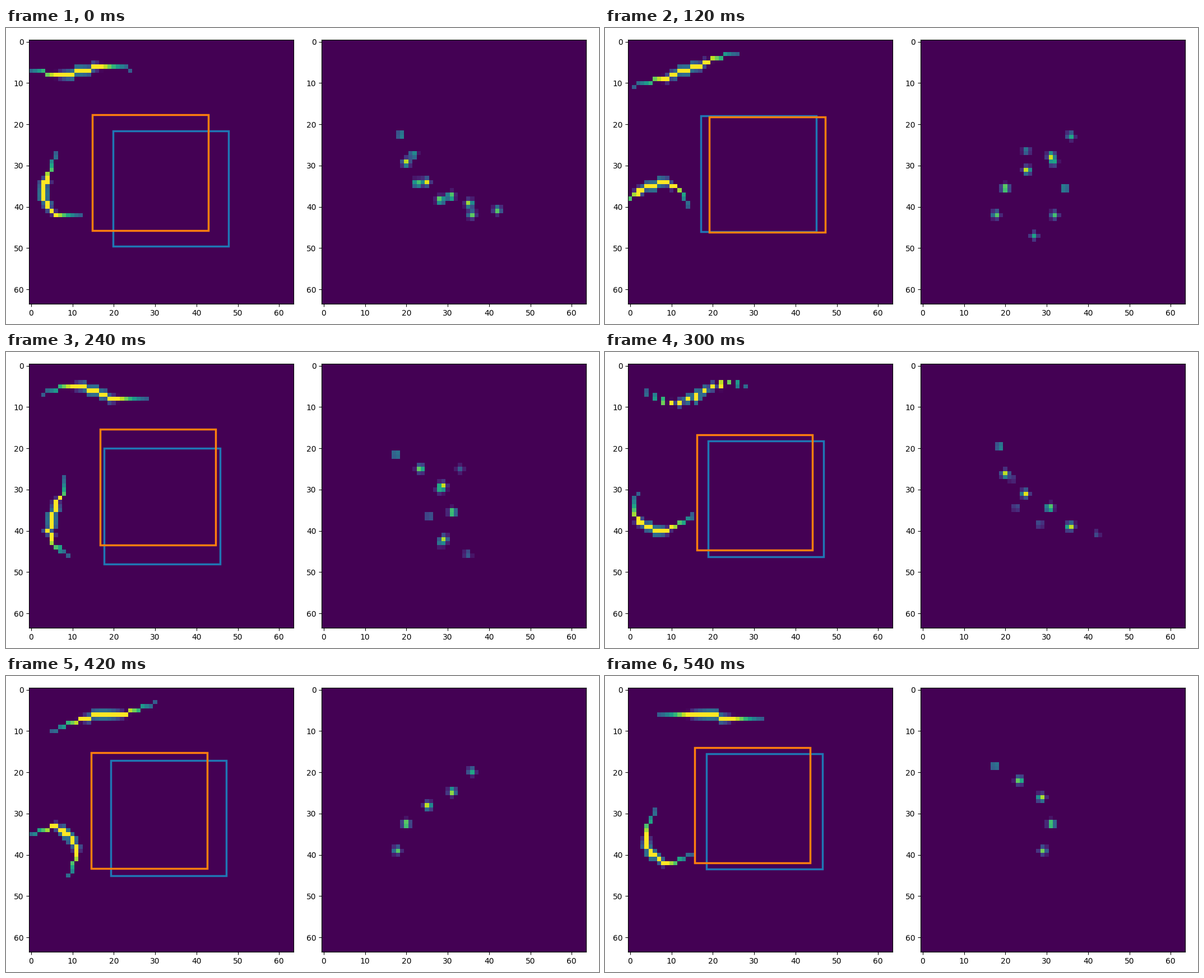
These frames come from a looping animation (1058x529 px, 0.6 s). A matplotlib script:

```python
import numpy as np
import matplotlib.pyplot as plt
from matplotlib.animation import FuncAnimation
from matplotlib.patches import Rectangle

W, H, DPI = 1058, 529, 100
FRAMES, INTERVAL = 10, 60
GRID, BOX = 64, 28

# The boxes jump about: corner positions at these steps, blended in between.
BOX_STEPS = [0, 1, 2, 4, 5, 7, 9]
BLUE_PATH = [(19.82, 21.61), (16.03, 20.33), (17.11, 18.02), (17.69, 19.99),
             (18.87, 18.26), (19.28, 17.1), (18.47, 15.51)]
ORANGE_PATH = [(14.81, 17.72), (17.59, 17.82), (19.15, 18.16), (16.64, 15.44),
               (16.16, 16.73), (14.6, 15.31), (15.62, 13.99)]

rows, cols = np.mgrid[:GRID, :GRID]


def cos_deg(angle):
    return np.cos(np.radians(angle))


def sin_deg(angle):
    return np.sin(np.radians(angle))


def chain(centre, headings, spacing):
    """Points a fixed distance apart that follow the headings, around a centre."""
    steps = spacing * np.column_stack([cos_deg(headings), sin_deg(headings)])
    points = np.vstack([[0, 0], np.cumsum(steps, axis=0)])
    return points - points.mean(axis=0) + centre


def upper_worm(step, length=25):
    """A slow drift to the right with a tilt and an S-bend beating in turn."""
    turn = 360 / 4.7
    tilt = -3.5 - 4.5 * cos_deg(turn * (step - 1.9))
    bend = 3 * cos_deg(turn * (step - 0.9))
    s = np.linspace(0, 1, length + 1)
    x = -1 + 0.9 * step + length * s
    y = 6.9 - 0.06 * step + tilt * (s - 0.5) + bend * sin_deg(360 * s - 20)
    return np.column_stack([x, y])


def lower_worm(step, length=22):
    """A body of fixed length whose heading is a wave running along it."""
    s = np.linspace(0, 1, length)
    headings = 40 + 75 * cos_deg(82.5 * step - 25 + 165 * s)
    return chain((5.6 + 0.2 * step, 36.5 + 0.12 * step), headings, 1)


def dot_chains(step):
    """Two swimming strings of dots; the second one fades away."""
    link = np.arange(4)
    glow = np.array([0.65, 0.95, 1, 1, 0.8])
    first = 90 + 60 * cos_deg(72 * (step - 1.4 - 0.53 * link))
    second = 70 + 65 * cos_deg(72 * (step - 3.9 + 0.6 * link))
    yield chain((26, 33 - 0.6 * step), first, 6.8), glow
    yield chain((30, 36), second, 7), glow * max(0, 1 - 0.14 * step)


def worm_image(step):
    image = np.zeros((GRID, GRID))
    for body in (upper_worm(step), lower_worm(step)):
        radii = 0.3 + 1.06 * sin_deg(np.linspace(0, 180, len(body))) ** 1.5
        for (x, y), radius in zip(np.round(body), radii):
            value = np.clip(radius - np.hypot(cols - x, rows - y), 0, 1)
            np.maximum(image, value, out=image)
    return image


def dot_image(step, sigma=0.62):
    image = np.zeros((GRID, GRID))
    for points, glow in dot_chains(step):
        for (x, y), level in zip(points, glow):
            spread = (cols - x) ** 2 + (rows - y) ** 2
            image += level * np.exp(-spread / (2 * sigma ** 2))
    image[image < 0.05] = 0
    return image.clip(0, 1)


def box_corner(path, step):
    return [np.interp(step, BOX_STEPS, values) for values in zip(*path)]


def add_panel(left, top=20.9, size=472):
    ax = fig.add_axes([left / W, 1 - (top + size) / H, size / W, size / H])
    picture = ax.imshow(np.zeros((GRID, GRID)), cmap="viridis", vmin=0, vmax=1,
                        interpolation="nearest", aspect="auto")
    ax.set_xticks(range(0, GRID, 10))
    ax.set_yticks(range(0, GRID, 10))
    return ax, picture


def add_box(color):
    return left_ax.add_patch(Rectangle((0, 0), BOX, BOX, fill=False, ec=color, lw=2.5))


plt.rcParams.update({"font.family": "DejaVu Sans", "font.size": 10})
fig = plt.figure(figsize=(W / DPI, H / DPI), dpi=DPI, facecolor="white")
left_ax, worms = add_panel(41.1)
right_ax, dots = add_panel(563.1)
blue = add_box("tab:blue")
orange = add_box("tab:orange")


def update(step):
    worms.set_data(worm_image(step))
    dots.set_data(dot_image(step))
    blue.set_xy(box_corner(BLUE_PATH, step))
    orange.set_xy(box_corner(ORANGE_PATH, step))
    return worms, dots, blue, orange


anim = FuncAnimation(fig, update, frames=FRAMES, interval=INTERVAL, repeat=True,
                     repeat_delay=0, blit=False)
plt.show()
```
